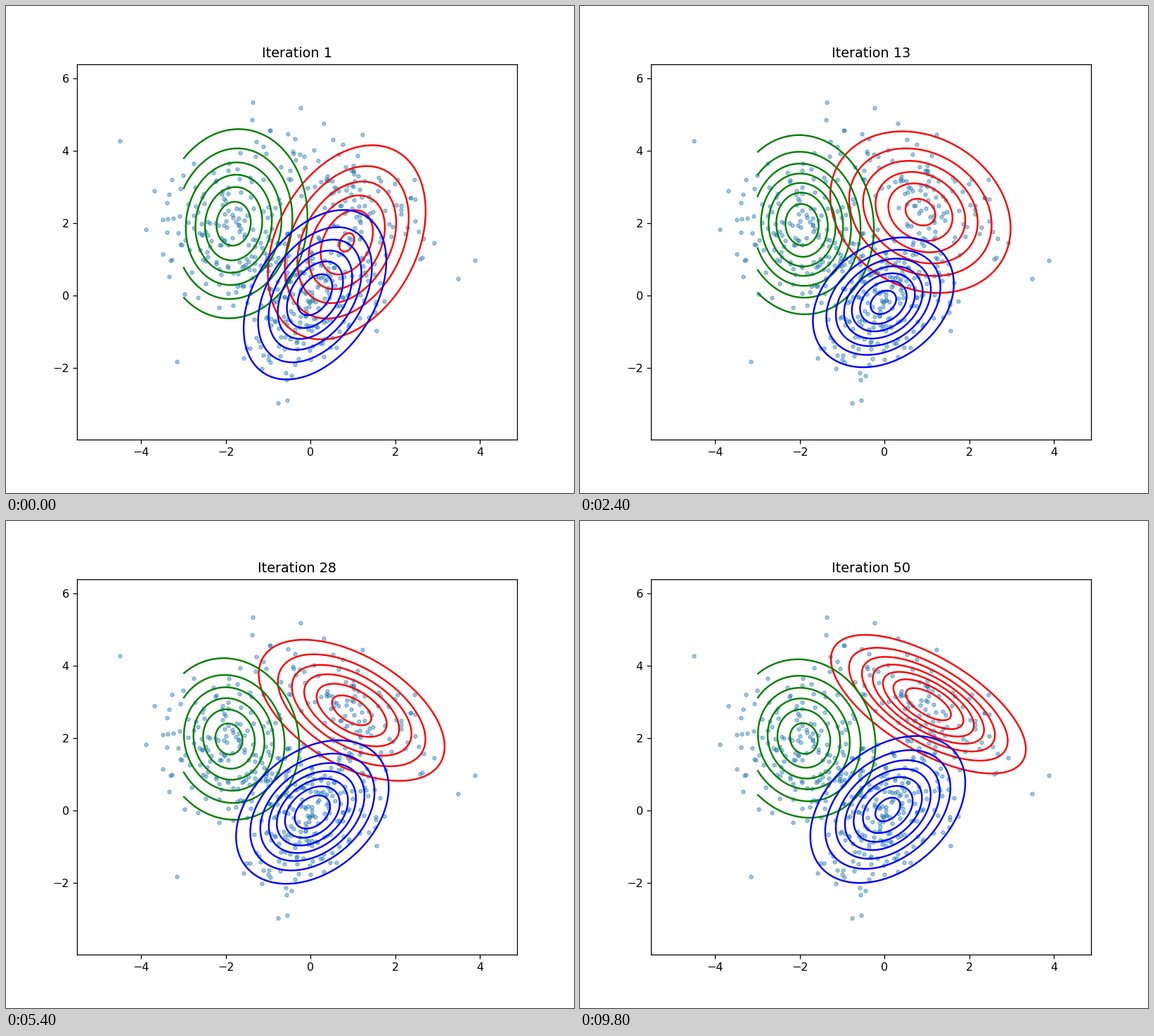
These frames come from a looping animation (808x693 px, 10000 ms). A matplotlib script:

```python
import numpy as np
import matplotlib.pyplot as plt
from matplotlib.animation import FuncAnimation

W, H, DPI = 808, 693, 115.5
STEPS = 50
DRIFT = 23  # iterations over which the whole fit settles


class Component:
    """Gaussian that leaves its start quickly, then drifts to its end.

    A state holds mean x, mean y, var x, cov xy, var y.
    """

    def __init__(self, color, count, pace, start, plateau, end):
        self.color, self.count, self.pace = color, count, pace
        self.start, self.plateau, self.end = map(np.array, (start, plateau, end))

    def state(self, n):
        fast = np.exp(-n / self.pace)
        slow = np.exp(-(n / DRIFT) ** 2)
        return (self.end + slow * (self.plateau - self.end)
                + fast * (self.start - self.plateau))

    def density(self, x, y, n):
        mx, my, a, c, b = self.state(n)
        det = a * b - c * c
        dx, dy = x - mx, y - my
        q = (b * dx * dx - 2 * c * dx * dy + a * dy * dy) / det
        return np.exp(-q / 2) / (2 * np.pi * np.sqrt(det))

    def sample(self, rng, reach=2.4):
        """Normal samples around the end state, without the far tails."""
        mx, my, a, c, b = self.end
        z = rng.standard_normal((self.count * 2, 2))
        z = z[np.hypot(z[:, 0], z[:, 1]) < reach][:self.count]
        return z @ np.linalg.cholesky([[a, c], [c, b]]).T + (mx, my)


COMPONENTS = (
    Component("red", 100, 8,
              start=(0.854, 1.476, 0.957, 0.445, 1.985),
              plateau=(0.757, 2.371, 1.315, -0.355, 1.290),
              end=(1.037, 2.951, 1.285, -0.699, 0.884)),
    Component("green", 165, 8,
              start=(-1.815, 1.990, 0.800, 0.080, 1.800),
              plateau=(-2.020, 1.936, 0.625, -0.075, 1.450),
              end=(-1.903, 1.996, 0.768, -0.083, 1.281)),
    Component("blue", 227, 2,
              start=(0.104, 0.029, 0.743, 0.411, 1.437),
              plateau=(-0.062, -0.251, 0.638, 0.170, 0.722),
              end=(0.078, 0.039, 0.838, 0.340, 1.032)),
)

# Lone points far from every component
STRAYS = [(-4.5, 4.28), (-3.15, -1.82), (-0.76, -2.97), (-0.55, -2.88),
          (3.48, 0.48), (3.87, 0.97), (-1.37, 5.35), (-0.23, 5.19)]

fig, ax = plt.subplots(figsize=((W + 1e-6) / DPI, (H + 1e-6) / DPI), dpi=DPI)
fig.subplots_adjust(left=0.125, right=0.9, bottom=0.11, top=0.8805)
rng = np.random.default_rng(7)
points = np.vstack([STRAYS] + [c.sample(rng) for c in COMPONENTS])
ax.scatter(points[:, 0], points[:, 1], s=10, alpha=0.4, color="tab:blue")
ax.set_xlim(-5.51, 4.875)
ax.set_ylim(-3.966, 6.394)
ax.set_xticks(range(-4, 5, 2))
ax.set_yticks(range(-2, 7, 2))

gx, gy = np.meshgrid(np.linspace(-3, 4.5, 180), np.linspace(-3, 6, 200))
curves = []


def update(frame):
    while curves:
        curves.pop().remove()
    for comp in COMPONENTS:
        z = comp.density(gx, gy, frame)
        curves.append(ax.contour(gx, gy, z, colors=comp.color))
    ax.set_title(f"Iteration {frame + 1}")
    return []


anim = FuncAnimation(fig, update, frames=STEPS, interval=200, repeat=True,
                     repeat_delay=0, blit=False)
plt.show()
```
